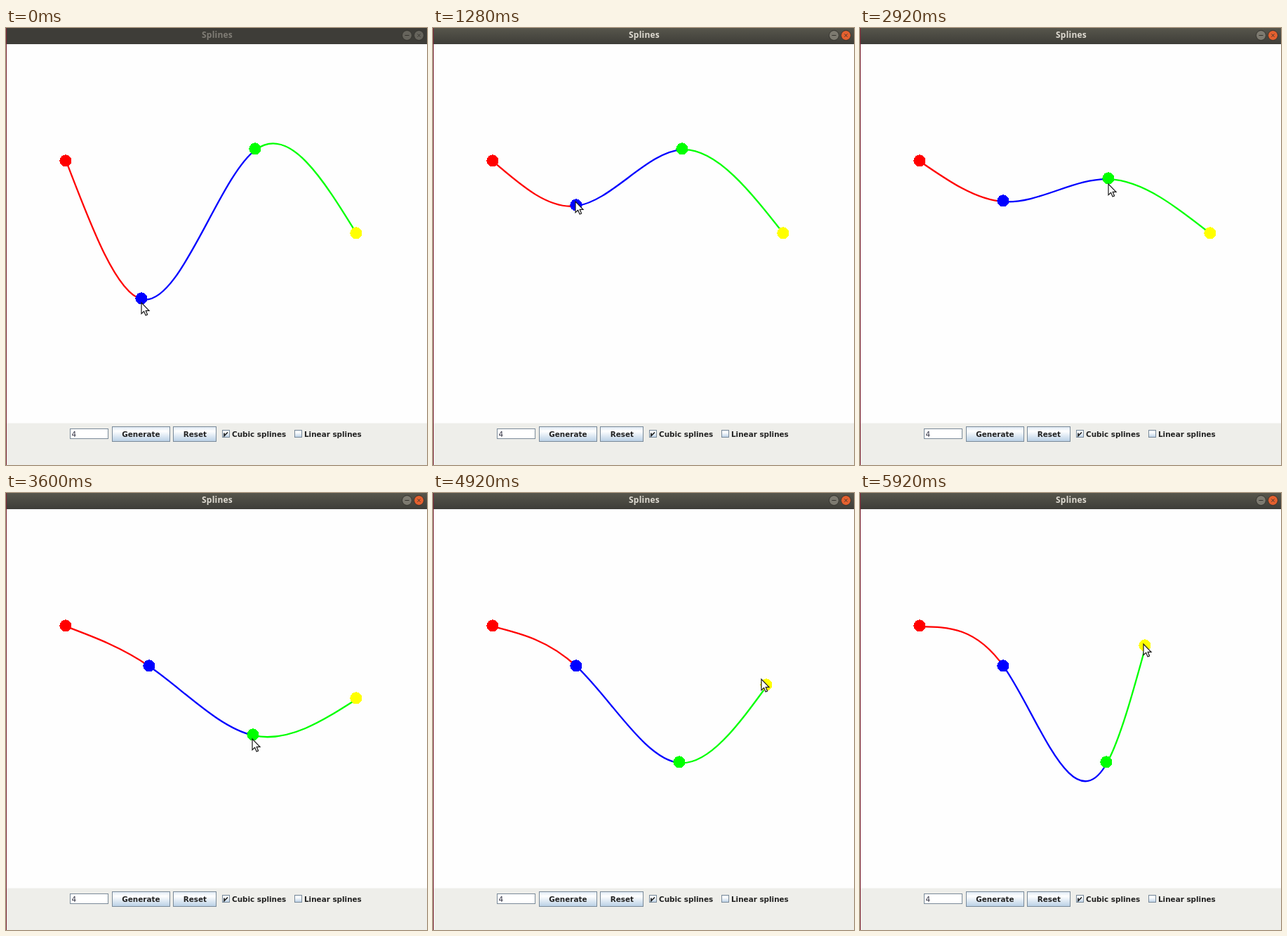
Recreate the animation shown at these times as an HTML page. Size 600 by 622 pixels, loop 6 s.

```html
<!DOCTYPE html>
<html lang="en">
<head>
<meta charset="utf-8">
<title>Splines</title>
<style>
  html, body { margin: 0; width: 100%; height: 100%; overflow: hidden; background: #fefefe; }
  svg { display: block; width: 600px; height: 622px; }
  .ui { font: bold 10.4px "DejaVu Sans", sans-serif; fill: #222; }
  .ui .value { font-weight: 400; fill: #334; }
  .title { font: bold 12px "Open Sans", "Noto Sans", sans-serif; letter-spacing: .2px; text-anchor: middle; fill: #dfdbd2; }
  .bar { fill: url(#bar); }
  .btn { fill: #7d7a70; stroke: #33322d; }
  .close { fill: #e4602f; stroke: #33322d; }
  .glyph { stroke: #35332e; fill: none; }
  .idle .bar { fill: #3e3d38; }
  .idle .title { fill: #807d76; }
  .idle .btn, .idle .close { fill: #66645c; }
  .box { stroke: #7a8a99; fill: url(#metal); shape-rendering: crispEdges; }
  .field { fill: #fff; }
  .curve { fill: none; stroke-width: 2.3; }
  .dot { shape-rendering: crispEdges; }
</style>
</head>
<body>
<svg viewBox="0 0 600 622">
  <defs>
    <linearGradient id="bar" x2="0" y2="1">
      <stop offset="0" stop-color="#57564c"/><stop offset="1" stop-color="#3e3d38"/>
    </linearGradient>
    <linearGradient id="metal" x2="0" y2="1">
      <stop offset="0" stop-color="#dde8f3"/><stop offset=".3" stop-color="#fff"/>
      <stop offset="1" stop-color="#b8cfe5"/>
    </linearGradient>
  </defs>
  <rect width="600" height="622" fill="#fefefe"/>

  <g id="head">
    <rect class="bar" width="600" height="23"/>
    <text class="title" x="301" y="14.3">Splines</text>
    <circle class="btn" cx="571.5" cy="10.5" r="7"/>
    <path class="glyph" d="M568.5 10.5h6"/>
    <circle class="close" cx="588.5" cy="10.5" r="7"/>
    <path class="glyph" d="M586.5 8.5l4 4m0-4l-4 4"/>
  </g>

  <rect y="562.5" width="600" height="60" fill="#eeeeea"/>
  <g class="ui">
    <rect class="box field" x="91.5" y="570.5" width="54" height="14"/>
    <text class="value" x="93.5" y="581.5">4</text>
    <rect class="box" x="151.5" y="567.5" width="82" height="21"/>
    <text x="165.3" y="581.5">Generate</text>
    <rect class="box" x="238.5" y="567.5" width="61" height="21"/>
    <text x="252.7" y="581.5">Reset</text>
    <rect class="box" x="308.5" y="572.5" width="10" height="10"/>
    <path d="M311 576.5v4l5-5" fill="none" stroke="#222" stroke-width="1.7"/>
    <text x="322" y="581.5">Cubic splines</text>
    <rect class="box" x="411.5" y="572.5" width="10" height="10"/>
    <text x="425" y="581.5">Linear splines</text>
  </g>
  <rect width="1" height="622" fill="#7d2535"/>

  <g id="curves" transform="translate(1 1.2)"></g>
  <g id="dots"></g>
  <path id="mouse" d="M0 0V15.6L3.6 12.2L6.1 18L8.6 16.9L6.2 11.3H11Z"
        fill="#fff" stroke="#1a1a1a" stroke-width="1.2"/>
</svg>
<script>
const LOOP = 6000, FOCUS_AT = 80;
const LAG = 50;       // a dragged dot trails the pointer by this many ms
const GRIP = [1, 2];  // dot centre relative to the pointer when let go
const COLORS = ['#f00', '#00f', '#0f0', '#ff0'];
const HOME = [[85, 189], [193, 385], [355, 172], [499, 292]];
const REST = [193, 391];

const smooth = u => (1 - Math.cos(Math.PI * u)) / 2;
const brake = u => 1 - (1 - u) ** 1.6;

// Pointer trips; those with a dot drag it along
const trips = [
  { from: 120, till: 1400, to: [203, 244], ease: smooth, dot: 1 },
  { from: 1640, till: 2300, to: [355, 172], ease: smooth },
  { from: 2400, till: 4000, to: [350, 381], ease: smooth, dot: 2 },
  { from: 4000, till: 4360, to: [496, 288], ease: smooth },
  { from: 4660, till: 5920, to: [404, 215], ease: brake, dot: 3 }
];

const mix = (a, b, k) => a.map((v, i) => v + (b[i] - v) * k);
const progress = ({ from, till, ease }, t) =>
  ease(Math.min(1, Math.max(0, (t - from) / (till - from))));

function pose(t) {
  let mouse = REST;
  const dots = [...HOME];
  for (const trip of trips) {
    mouse = mix(mouse, trip.to, progress(trip, t));
    if (trip.dot) {
      const drop = trip.to.map((v, i) => v + GRIP[i]);
      dots[trip.dot] = mix(HOME[trip.dot], drop, progress(trip, t - LAG));
    }
  }
  return { mouse: mouse.map(Math.round), dots: dots.map(p => p.map(Math.round)) };
}

// Screen updates come 0, 80 and 120 ms into every 200 ms
function tick(t) {
  const r = t % 200;
  return t - r + (r < 80 ? 0 : r < 120 ? 80 : 120);
}

// Natural cubic spline y(x) through four points, one Bezier per span
function spline(p) {
  const h = [], d = [];
  for (let i = 0; i < 3; i++) {
    h[i] = p[i + 1][0] - p[i][0];
    d[i] = (p[i + 1][1] - p[i][1]) / h[i];
  }
  const a = 2 * (h[0] + h[1]), b = h[1], c = 2 * (h[1] + h[2]);
  const u = 6 * (d[1] - d[0]), v = 6 * (d[2] - d[1]), det = a * c - b * b;
  const m = [0, (u * c - b * v) / det, (a * v - b * u) / det, 0];
  return h.map((w, i) => {
    const [x, y] = p[i], [x2, y2] = p[i + 1];
    const s = d[i] - w * (2 * m[i] + m[i + 1]) / 6;
    const s2 = s + w * (m[i] + m[i + 1]) / 2;
    return `M${x} ${y}C${x + w / 3} ${y + s * w / 3} ${x2 - w / 3} ${y2 - s2 * w / 3} ${x2} ${y2}`;
  });
}

const $ = id => document.getElementById(id);
function set(el, attrs) {
  for (const k in attrs) el.setAttribute(k, attrs[k]);
  return el;
}
const add = (parent, tag, attrs) =>
  $(parent).appendChild(set(document.createElementNS('http://www.w3.org/2000/svg', tag), attrs));

const curves = COLORS.slice(0, 3).map(stroke => add('curves', 'path', { class: 'curve', stroke }));
const circles = COLORS.map(fill => add('dots', 'circle', { class: 'dot', r: 8.6, fill }));

function draw(t) {
  const { mouse, dots } = pose(t);
  spline(dots).forEach((d, i) => set(curves[i], { d }));
  dots.forEach(([cx, cy], i) => set(circles[i], { cx, cy }));
  set($('mouse'), { transform: `translate(${mouse})` });
  set($('head'), { class: t < FOCUS_AT ? 'idle' : '' });
}

const start = performance.now();
function loop() {
  draw(tick(Math.max(0, performance.now() - start) % LOOP));
  requestAnimationFrame(loop);
}
loop();
</script>
</body>
</html>
```
